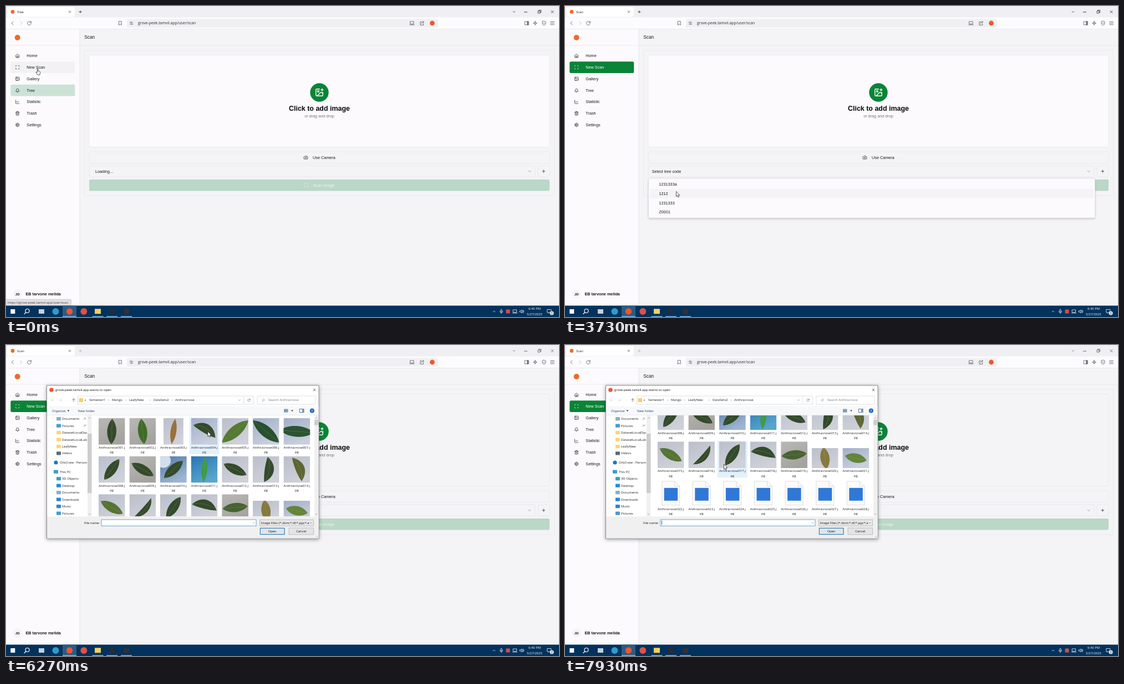
Write an HTML page that moves like this. It is 997 px wide and 561 px high and loops after 8000 ms.

```html
<!DOCTYPE html>
<html lang="en">
<head>
<meta charset="utf-8">
<title>Scan</title>
<style>
html, body { margin: 0; width: 100%; height: 100%; overflow: hidden; background: #f4f3f6; }
svg { display: block; width: 100%; height: 100%; }
text { white-space: pre; }
.page { font-family: "Liberation Sans", Arial, sans-serif; }
.ui { font-family: "Open Sans", "Noto Sans", sans-serif; }
</style>
</head>
<body>
<svg id="stage" viewBox="0 0 997 561"></svg>
<script>
const LOOP = 8000;
const GREEN = '#0a8437', INK = '#18181b', LINE = '#e7e6ea', BACK = '#f4f3f6', PALE = '#fcfafd';
const HOST = 'grove-peek.tamvil.app', PATH = HOST + '/user/scan';

// Drawing helpers
const rect = (x, y, w, h, fill, more = '') =>
  `<rect x="${x}" y="${y}" width="${w}" height="${h}" fill="${fill}" ${more}/>`;
const dot = (x, y, r, fill, more = '') => `<circle cx="${x}" cy="${y}" r="${r}" fill="${fill}" ${more}/>`;
const line = (d, color, w = 1, more = '') =>
  `<path d="${d}" fill="none" stroke="${color}" stroke-width="${w}" ${more}/>`;
const text = (x, y, s, size, fill = INK, more = '') =>
  `<text x="${x}" y="${y + size * 0.35}" font-size="${size}" fill="${fill}" ${more}>${s}</text>`;
const icon = (d, x, y, size, color = INK, w = 2, more = '') =>
  `<path d="${d}" transform="translate(${x - size / 2} ${y - size / 2}) scale(${size / 24})" fill="none" stroke="${color}"
    stroke-width="${w}" stroke-linecap="round" stroke-linejoin="round" ${more}/>`;
const group = (id, body, more = '') => `<g id="${id}" ${more}>${body}</g>`;
const MID = 'text-anchor="middle"', BOLD = 'font-weight="700"';

const HILL = 'M21 15l-3-3a2 2 0 0 0-3 0l-9 9M7 9a2 2 0 1 0 4 0a2 2 0 1 0-4 0';
const spokes = [...Array(8)].map((_, i) => {
  const c = Math.cos(i * Math.PI / 4), s = Math.sin(i * Math.PI / 4);
  return `M${12 + 8 * c} ${12 + 8 * s}L${12 + 10 * c} ${12 + 10 * s}`;
}).join('');
const ICONS = {
  home: 'M3 10l9-7 9 7v9a2 2 0 0 1-2 2H5a2 2 0 0 1-2-2zM9 21v-8h6v8',
  scan: 'M3 7V5a2 2 0 0 1 2-2h2M17 3h2a2 2 0 0 1 2 2v2M21 17v2a2 2 0 0 1-2 2h-2M7 21H5a2 2 0 0 1-2-2v-2',
  image: 'M5 3h14a2 2 0 0 1 2 2v14a2 2 0 0 1-2 2H5a2 2 0 0 1-2-2V5a2 2 0 0 1 2-2' + HILL,
  tree: 'M4 17q2-2 2-7a6 6 0 0 1 12 0q0 5 2 7zM10 21h4',
  chart: 'M3 3v16a2 2 0 0 0 2 2h16M19 9l-5 5-4-4-3 3',
  trash: 'M3 6h18M19 6v14a2 2 0 0 1-2 2H7a2 2 0 0 1-2-2V6M8 6V4a2 2 0 0 1 2-2h4a2 2 0 0 1 2 2v2M10 11v6M14 11v6',
  gear: 'M4 12a8 8 0 1 0 16 0a8 8 0 1 0-16 0M9 12a3 3 0 1 0 6 0a3 3 0 1 0-6 0' + spokes,
  camera: 'M14.5 4h-5L7 7H4a2 2 0 0 0-2 2v9a2 2 0 0 0 2 2h16a2 2 0 0 0 2-2V9a2 2 0 0 0-2-2h-3zM9 13a3 3 0 1 0 6 0a3 3 0 1 0-6 0',
  add: 'M16 5h6M19 2v6M21 11.5V19a2 2 0 0 1-2 2H5a2 2 0 0 1-2-2V5a2 2 0 0 1 2-2h7.5' + HILL,
  down: 'M6 9l6 6 6-6', up: 'M6 15l6-6 6 6', next: 'M9 6l6 6-6 6', plus: 'M5 12h14M12 5v14', close: 'M5 5l14 14M19 5L5 19',
  back: 'M15 4l-8 8 8 8', forward: 'M9 4l8 8-8 8',
  left: 'M20 12H4M11 5l-7 7 7 7', right: 'M4 12h16M13 5l7 7-7 7', rise: 'M12 20V4M5 11l7-7 7 7',
  reload: 'M20 8a9 9 0 1 0 1 5M21 3v6h-6',
  find: 'M7 10a7 7 0 1 0 14 0a7 7 0 1 0-14 0M9 15l-6 6',
  bookmark: 'M6 3h12v18l-6-5-6 5z', tune: 'M3 7h4M13 7h8M7 7a3 3 0 1 0 6 0a3 3 0 1 0-6 0M3 17h8M17 17h4M11 17a3 3 0 1 0 6 0a3 3 0 1 0-6 0',
  screen: 'M4 4h16v12H4zM1 20h22', share: 'M10 5H4v16h15v-7M9 14q1-8 11-8M16 2l5 4-5 4',
  panel: 'M3 4h18v16H3zM14 4v16M16 4v16M18 4v16', star: 'M12 3l2 7 7 2-7 2-2 7-2-7-7-2 7-2z',
  shield: 'M12 2l8 3v7q0 7-8 10q-8-3-8-10V5zM9 12h6', menu: 'M3 5h18M3 12h18M3 19h18',
  mic: 'M9 5a3 3 0 0 1 6 0v6a3 3 0 0 1-6 0zM5 11a7 7 0 0 0 14 0M12 18v4', note: 'M3 4h18v14H11l-4 4v-4H3z',
  sound: 'M3 9h4l5-5v16l-5-5H3zM16 8a6 6 0 0 1 0 8M19 5a10 10 0 0 1 0 14'
};

function browser() {
  const ic = (n, x, s = 9) => icon(ICONS[n], x, 31, s, '#4a4a50', 2);
  return rect(0, 0, 997, 21, '#f0eff3') + rect(2, 2, 122, 17.5, '#fff', 'rx="3.5"') +
    dot(12, 10.5, 3.4, '#ef6a2b') +
    group('tabOld', text(20, 10.5, 'Tree', 5.87)) + group('tabNew', text(20, 10.5, 'Scan', 5.87)) +
    icon(ICONS.close, 115, 10.5, 5.5, INK, 2.6) +
    group('newTab', icon(ICONS.plus, 134, 10.5, 7.5, '#222', 2.5)) +
    group('winBtns', icon(ICONS.down, 916, 10.5, 7, '#222', 2.6) + line('M934 11h6', '#222', .9) +
      line('M959 9h4v4h-4zM960.5 9V7.5h4v4H963', '#222', .8) + icon(ICONS.close, 985, 10.5, 7, '#222', 2.6)) +
    rect(0, 20.5, 997, 21, '#fcfbfd') + line('M0 41.5H997', LINE, .8) +
    ic('back', 12, 9) + icon(ICONS.forward, 27, 31, 9, '#b9b9bd') + ic('reload', 42) + ic('bookmark', 206) +
    rect(218, 23.5, 561, 15.5, '#f0eff2', 'rx="3"') + ic('tune', 226, 7.5) + text(238, 31, PATH, 6.85, '#2b2b30') +
    ic('screen', 732) + ic('share', 750) + dot(768.5, 31, 4.4, '#f0562d') +
    ic('panel', 939) + ic('star', 954) + ic('shield', 970) + ic('menu', 985);
}

function sidebar() {
  const items = [['home', 'Home'], ['scan', 'New Scan'], ['image', 'Gallery'], ['tree', 'Tree'],
    ['chart', 'Statistic'], ['trash', 'Trash'], ['gear', 'Settings']];
  const rows = items.map(([n, s], i) => {
    const y = 89.8 + i * 20.77;
    return group('nav' + i, rect(8.3, y - 10.3, 116, 20.7, GREEN, 'rx="2.5" fill-opacity="0"') +
      icon(ICONS[n], 20.7, y, 8.3, 'currentColor') + text(37.3, y, s, 7.27, 'currentColor'), `color="${INK}"`);
  }).join('');
  return rect(0, 42, 133, 499, PALE) + line('M133 42V541M0 71H133', LINE, .9) + dot(20.7, 57, 5, '#ee6a2c') + rows +
    dot(20.7, 519.5, 8, BACK) + text(20.7, 519.5, 'JD', 6.2, INK, MID + ' ' + BOLD) +
    text(35.5, 519.5, 'EB tarvone melida', 7.27, INK, BOLD);
}

function main() {
  const frame = (x, y, w, h, fill = 'none', more = '') =>
    rect(x, y, w, h, fill, `rx="2.5" stroke="${LINE}" stroke-width=".8" ${more}`);
  return rect(133, 42, 864, 499, BACK) + text(141.3, 56.5, 'Scan', 8.31) + line('M133 71H997', LINE, .9) +
    frame(141.5, 80, 847, 262) + frame(150, 88.5, 830, 166, PALE, 'id="drop"') +
    dot(565, 156, 16.7, GREEN) + icon(ICONS.add, 565, 156, 16.6, '#fff') +
    text(565, 185, 'Click to add image', 12.46, '#09090b', MID + ' ' + BOLD) +
    text(565, 198.5, 'or drag and drop', 7.27, '#737378', MID) +
    frame(150, 263, 830, 21) + icon(ICONS.camera, 540.5, 273.3, 8.3) + text(553, 273.3, 'Use Camera', 7.27) +
    frame(150, 288, 804, 20.5) +
    group('ring', rect(148.8, 286.6, 807.6, 23.4, '#f8f7fa', `rx="3.5" stroke="${GREEN}" stroke-width="1.6"`)) +
    group('wait', text(161, 298.2, 'Loading...', 7.27)) +
    group('pick', text(156.7, 298.2, 'Select tree code', 7.27)) +
    group('chosen', text(156.7, 298.2, 'Z0001', 7.27)) +
    icon(ICONS.down, 944, 298.3, 8.3, '#77777c') + frame(959, 288, 21, 20.5) + icon(ICONS.plus, 969.3, 298.2, 8.3) +
    rect(150, 313, 830, 20.5, '#bad7c7', 'rx="2.5"') +
    icon(ICONS.scan, 541.5, 323.2, 8.3, '#eef5f1') + text(553.5, 323.2, 'Scan Image', 7.27, '#eef5f1');
}

function menu() {
  const codes = ['1231333a', '1212', '1231333', 'Z0001'];
  return group('menu', rect(150.5, 311, 805, 71.3, PALE, 'rx="2.5" stroke="#dddce0" stroke-width=".8" filter="url(#soft)"') +
    rect(153, 330, 800, 16.6, BACK, 'id="menuHover" rx="2"') +
    codes.map((s, i) => text(169.4, 321.8 + i * 16.6, s, 7.27)).join(''));
}

function taskbar() {
  const y = 551, ic = (n, x, s) => icon(ICONS[n], x, y, s, '#fff', 2);
  const app = x => rect(x - 10, 559.5, 20, 1.5, '#76b9ed');
  return rect(0, 540.5, 997, 20.5, '#03325d') + rect(102, 540.5, 25, 20.5, '#2b5c83') +
    rect(102, 559.5, 25, 1.5, '#76b9ed') + [165.5, 191, 217].map(app).join('') +
    rect(8.3, 547, 8, 8, '#fff') + icon(ICONS.find, 37.5, y, 12, '#fff', 2.4) + rect(59, 547, 10, 8, '#c4d0da') +
    dot(89.5, y, 6, '#2d9ccd') + dot(114.5, y, 5.7, '#f1552d') + dot(140.3, y, 6, '#df5143') +
    rect(160, 546.3, 11, 9, '#f6cf62') + rect(186, 546, 10, 10, '#252b3a') + dot(217, y, 5.8, '#30303a') +
    ic('up', 880, 8) + ic('mic', 893, 9) + rect(901.5, 547.5, 7, 7, '#d84b4d') + ic('screen', 917.5, 9) + ic('sound', 930, 9) +
    text(953, 545.7, '6:40 PM', 5.87, '#fff', MID) + text(953, 555.5, '5/27/2025', 5.87, '#fff', MID) +
    icon(ICONS.note, 979.5, 550.5, 9, '#fff', 2) + dot(984, 554, 3.6, '#dfe6eb') + text(984, 554, '3', 5.2, '#123', MID);
}

// Leaf photos: tilt in degrees; skies, leaf tones and proportions follow from the index.
const TILT = [2, -7, 8, -60, 50, -50, -86, 36, -60, 48, 4, -64, 8, -22, -60, 42, 34, -76, 84, -8, -78];
const SKY = { 0: 'warm', 1: 'warm', 9: 'blue', 10: 'vivid', 3: 'cool', 5: 'cool', 6: 'cool', 8: 'warm', 18: 'warm', 20: 'cool' };
const TONE = { 1: '#3f6c2a', 2: '#98703a', 4: '#567a33', 5: '#28502f', 6: '#2a5433', 10: '#3f9a46', 13: '#5d6633', 14: '#557434', 18: '#476233', 19: '#85793f', 20: '#65843a' };
const LARGE = [4, 5, 6], CURVED = [3, 12, 13, 15, 17], SLIM = [2, 10, 15];
const STEP_X = 55.6, STEP_Y = 68.6, TOP = 132;

function tile(i) {
  const cx = 190.7 + i % 7 * STEP_X, top = TOP + Math.floor(i / 7) * STEP_Y;
  const label = text(cx, top + 53, `Anthracnose${String(i + 1).padStart(3, '0')}.j`, 5.87, '#222', MID) +
    text(cx, top + 61.3, 'pg', 5.87, '#222', MID);
  if (i > 20) return `<path d="M${cx - 16} ${top + 3}h23l9 9v34h-32z" fill="#fbfbfb" stroke="#cfcfcf" stroke-width=".7"/>` +
    line(`M${cx + 7} ${top + 3}v9h9`, '#cfcfcf', .7) + rect(cx - 12, top + 15, 24.5, 23, '#2f78d7') + label;
  const w = i == 2 ? 36 : 47.8, h = i > 18 ? 36 : 47.8, y = top + 47.8 - h;
  const len = i > 18 ? 20 : LARGE.includes(i) ? 31 : 23;
  const fat = SLIM.includes(i) ? 7 : LARGE.includes(i) ? 13 : 11;
  const bend = CURVED.includes(i) ? 8 : 0, k = len * .45;
  const leaf = `M0 ${-len}C${bend + fat} ${-k} ${bend + fat} ${k} 0 ${len}C${bend - fat} ${k} ${bend - fat} ${-k} 0 ${-len}`;
  return `<svg x="${cx - w / 2}" y="${y}" width="${w}" height="${h}">` + rect(0, 0, w, h, `url(#${SKY[i] || 'pale'})`) +
    (i == 9 ? dot(6, 8, 13, '#eef5fb', 'opacity=".8"') : '') +
    `<g transform="translate(${w / 2} ${h / 2}) rotate(${TILT[i]})"><path d="${leaf}" fill="${TONE[i] || '#334a2b'}"/>` +
    line(`M0 ${-len}C${bend} ${-k} ${bend} ${k} 0 ${len}`, '#8d9a66', .7, 'opacity=".45"') +
    (i % 3 ? '' : dot(2 + bend / 2, 4, 1.3, '#5f4530') + dot(bend / 2 - 2, -5, 1, '#5f4530')) + '</g></svg>' + label;
}

function dialog() {
  const s = 5.87, ic = (n, x, y, size, c = '#444', w = 2) => icon(ICONS[n], x, y, size, c, w);
  const crumbs = [[150, 'Semester1'], [191, 'Mango'], [222, 'LeafyNew'], [266, 'DataSetv2'], [305, 'Anthracnose']];
  const tree = [['Documents', 133, '#8eaec4'], ['Pictures', 145.5, '#4a9ad0'], ['DatasetLocal(Squ', 158, '#f7d774'],
    ['DatasetLocalLabe', 170.5, '#f7d774'], ['LeafyNew', 183, '#f7d774'], ['Videos', 195.3, '#596b7c'],
    ['OrbCrate - Person', 212, '#1679ce', 1], ['This PC', 228.5, '#3c9bd2', 1], ['3D Objects', 241, '#36a2c0'],
    ['Desktop', 253.5, '#2c8bd0'], ['Documents', 266, '#8eaec4'], ['Downloads', 278.5, '#2e86d1'],
    ['Music', 291, '#2e86d1'], ['Pictures', 303.5, '#4a9ad0']];
  const treeRows = tree.map(([name, y, c, root]) =>
    (name.startsWith('Orb') ? dot(90, y, 3.6, c) : rect(root ? 86 : 91, y - 3, 8, 6.2, c, 'rx=".7"')) +
    text(root ? 97 : 101, y, name, s, '#222')).join('');
  const field = (x, y, w, h, edge, fill = '#fff', sw = .8) => rect(x, y, w, h, fill, `stroke="${edge}" stroke-width="${sw}"`);
  return group('dialog', rect(73.5, 73, 490.5, 276, '#fff', 'stroke="#77777b" stroke-width=".8" filter="url(#deep)"') +
    dot(82, 81, 3.8, '#f0562d') + text(89, 81, HOST + ' wants to open', s, '#111') + ic('close', 556, 81, 6.5, '#222', 2.5) +
    ic('left', 84, 99.5, 7, '#c4c4c8') + ic('right', 98, 99.5, 7, '#c4c4c8') + ic('down', 111, 99.5, 4, '#c4c4c8') + ic('rise', 122, 99.5, 8) +
    field(129.5, 92, 317, 15, '#dadadd') + line('M428.5 92v15', '#dadadd', .8) + rect(131.5, 96, 7.5, 7, '#f7d06a') +
    text(141.5, 99, '«', s) + crumbs.map(([x, n], i) => text(x, 99.3, n, s, '#222') + (i ? ic('next', [0, 185.5, 216, 260, 300][i], 99.5, 4.5) : '')).join('') +
    ic('down', 421, 99.5, 6) + ic('reload', 438, 99.5, 6) +
    field(453, 92, 105, 15, '#dadadd') + ic('find', 464, 99.5, 6, '#777') + text(473, 99.3, 'Search Anthracnose', s, '#75757a') +
    rect(74, 110.5, 489.5, 15.8, '#f7f8fa') + line('M74 126.5H563.5', '#e3e5e9', .7) +
    text(83, 118.5, 'Organize', s, '#1d3c61') + '<path d="M110.5 117.5h4l-2 2.4zM514 117.5h4l-2 2.4z" fill="#333"/>' +
    text(130, 118.5, 'New folder', s, '#1d3c61') + rect(501, 115.5, 7.5, 6, '#7c9db5') +
    field(529.5, 115.5, 7.5, 6, '#456') + rect(534, 115.5, 3, 6, '#5b9bd0') +
    dot(551.8, 118.5, 4, '#1567bd') + text(551.8, 118.5, '?', 6, '#fff', MID + ' ' + BOLD) +
    `<g clip-path="url(#treeClip)">${treeRows}</g>` +
    rect(147, 127, 7.5, 182, '#f0f0f0') + rect(147, 160, 7.5, 107, '#cdcdcd') +
    [133, 145.5].map(y => line(`M140 ${y + 2}l4-4m-3 0l3 3`, '#777', .8)).join('') +
    ic('up', 150.7, 131.5, 5.5) + ic('down', 150.7, 305.3, 5.5) +
    '<g clip-path="url(#fileClip)">' + group('files', rect(0, 0, 54, 66, '#e3f1fc', 'id="fileHover"') +
      [...Array(28)].map((_, i) => tile(i)).join('')) + '</g>' +
    rect(556, 127, 7.3, 182, '#f0f0f0') + rect(556, 135, 7.3, 9.5, '#cdcdcd') +
    ic('up', 559.6, 131.5, 5.5) + ic('down', 559.6, 305.3, 5.5) +
    rect(74, 309.5, 489.5, 39, '#f0f0f0') + text(141, 320.8, 'File name:', s) +
    field(172, 315, 279, 11.3, '#4593cc') + rect(174, 316.8, .7, 7.5, '#111', 'id="caret"') + ic('down', 446.5, 321, 5.5) +
    field(457.5, 315, 97, 11.3, '#b4b4b8', '#e6e6e8') + text(459.5, 320.8, 'Image Files (*.xbm;*.tif;*.pjp;*.a', s) + ic('down', 549.5, 321, 5.5) +
    field(458.4, 330.4, 43.7, 11.2, '#2f7fc0', '#e4e4e6', 1.2) + text(480.2, 336.2, 'Open', s, '#111', MID) +
    field(510, 330, 44.5, 12, '#b4b4b8', '#e4e4e6') + text(532.2, 336.2, 'Cancel', s, '#111', MID) +
    line('M559 347l3-3M561 347l1-1', '#aaa', .7));
}

const sky = (id, a, b) => `<linearGradient id="${id}" x2=".5" y2="1"><stop stop-color="${a}"/><stop offset="1" stop-color="${b}"/></linearGradient>`;
const clip = (id, x, w) => `<clipPath id="${id}">${rect(x, 127, w, 182.3, '#000')}</clipPath>`;
const glow = (id, dy, blur, a) => `<filter id="${id}" x="-5%" y="-20%" width="110%" height="150%"><feDropShadow dx="0" dy="${dy}" stdDeviation="${blur}" flood-opacity="${a}"/></filter>`;
const stage = document.getElementById('stage');
stage.innerHTML = '<defs>' + sky('warm', '#b9b8b6', '#a5a39f') + sky('pale', '#babfcb', '#cfd1d9') + sky('cool', '#a2afc8', '#c8cfdd') +
  sky('blue', '#4f79a7', '#9db5d0') + sky('vivid', '#2a74b4', '#5aa5cc') + clip('treeClip', 74, 72) + clip('fileClip', 156, 400) +
  glow('soft', 1.5, 1.5, .2) + glow('deep', 1.5, 3, .4) + '</defs>' +
  group('site', main() + sidebar(), 'class="page"') + group('chrome', browser(), 'class="ui"') +
  group('list', menu(), 'class="page"') +
  group('status', rect(-1, 529, 118.5, 12, '#dfdee2', 'stroke="#cbcace" stroke-width=".7" rx="1"') +
    text(2.8, 535, 'https://' + PATH, 5.87, '#45454a'), 'class="ui"') +
  group('bar', taskbar(), 'class="ui"') + group('modal', dialog(), 'class="ui"') +
  `<g id="cursor" fill="#fff" stroke="#222" stroke-width=".75" stroke-linejoin="round">
    <path id="arrow" d="M0 0V9.2L2.1 7.3 3.4 10.3 4.9 9.6 3.6 6.7H6.4Z"/>
    <path id="hand" d="M-.7 .6Q.4-.2.8 1V4.3L3.6 4.9Q4.9 5.3 4.7 6.6L3.9 11.3H0L-2.8 7.4Q-3.1 6.1-1.9 6.3L-.7 7.2Z"/></g>`;

const $ = {};
stage.querySelectorAll('[id]').forEach(el => $[el.id] = el);

const clamp = v => Math.max(0, Math.min(1, v));
const span = (t, a, b) => clamp((t - a) / (b - a));
const show = (id, on) => $[id].setAttribute('visibility', on ? 'visible' : 'hidden');
const set = (id, props) => { for (const k in props) $[id].setAttribute(k, props[k]); };

const TRAIL = [[0, 57, 113], [700, 57, 113], [1850, 549.5, 297], [2300, 549.5, 297], [3450, 200.5, 334.5], [3780, 200.5, 334.5],
  [4080, 188, 367], [4300, 188, 367], [4880, 527.5, 213], [5400, 527.5, 213], [5710, 375.3, 163], [6100, 375.3, 163],
  [6850, 287.7, 109], [7050, 287.7, 109], [7450, 286.5, 215], [LOOP, 286.5, 215]];
function pointer(t) {
  const i = TRAIL.findIndex(p => p[0] > t), [t0, x0, y0] = TRAIL[i - 1], [t1, x1, y1] = TRAIL[i];
  const p = span(t, t0, t1), e = p * p * (3 - 2 * p);
  return [x0 + (x1 - x0) * e, y0 + (y1 - y0) * e];
}

const MENU_OPEN = 2050, MENU_SHUT = 4250, DIALOG_OPEN = 5620, SCROLL_AT = 7730;

function draw(t) {
  const [x, y] = pointer(t);
  const modal = t >= DIALOG_OPEN, menuOn = t >= MENU_OPEN && t < MENU_SHUT;
  const overDrop = !menuOn && x > 150 && x < 980 && y > 88 && y < 254;
  const overNav = x < 124 && y > 79 && y < 225;

  const active = span(t, 30, 150), bg = i => $['nav' + i].firstElementChild;
  bg(1).setAttribute('fill', active ? GREEN : '#f2f1f4');
  bg(1).setAttribute('fill-opacity', active || 1);
  $.nav1.setAttribute('color', active > .5 ? '#fff' : INK);
  bg(3).setAttribute('fill-opacity', .2 * (1 - span(t, 0, 60)));

  show('tabOld', t < 200);
  show('tabNew', t >= 200);
  show('status', t < 1150);
  show('wait', t < 900);
  show('pick', t >= 900 && t < MENU_SHUT);
  show('chosen', t >= MENU_SHUT);
  show('ring', t >= MENU_SHUT && t < 5450);
  set('drop', { fill: modal || overDrop ? BACK : PALE });
  set('newTab', { opacity: modal ? .3 : 1 });
  set('winBtns', { opacity: modal ? .75 : 1 });

  show('menu', menuOn);
  const m = span(t, MENU_OPEN, MENU_OPEN + 110), ms = .95 + .05 * m;
  set('menu', { opacity: m, transform: `translate(553 ${311 - 4.15 * (1 - m)}) scale(${ms}) translate(-553 -311)` });
  const row = Math.floor((y - 313.5) / 16.6);
  show('menuHover', menuOn && row >= 0 && row < 4);
  set('menuHover', { y: 313.5 + row * 16.6 });

  show('dialog', modal);
  const d = 1 - (1 - span(t, DIALOG_OPEN, DIALOG_OPEN + 220)) ** 2, ds = .96 + .04 * d;
  set('dialog', { opacity: clamp(d * 1.2), transform: `translate(318.5 211) scale(${ds}) translate(-318.5 -211)` });
  const scroll = t >= SCROLL_AT ? 95 : 0;
  set('files', { transform: `translate(0 ${-scroll})` });
  const col = Math.floor((x - 162.7) / STEP_X), line = Math.floor((y + scroll - TOP + 1) / STEP_Y);
  show('fileHover', modal && y > 127 && y < 309 && col >= 0 && col < 7);
  set('fileHover', { x: 163.7 + col * STEP_X, y: TOP - 1 + line * STEP_Y });
  show('caret', modal && Math.floor((t - 5700) / 530) % 2 == 0);

  const hand = !modal && (overDrop || overNav);
  show('hand', hand);
  show('arrow', !hand);
  set('cursor', { transform: `translate(${x} ${y})` });
}

let start;
function tick(now) {
  start ??= now;
  draw((now - start) % LOOP);
  requestAnimationFrame(tick);
}
draw(0);
requestAnimationFrame(tick);
</script>
</body>
</html>
```
